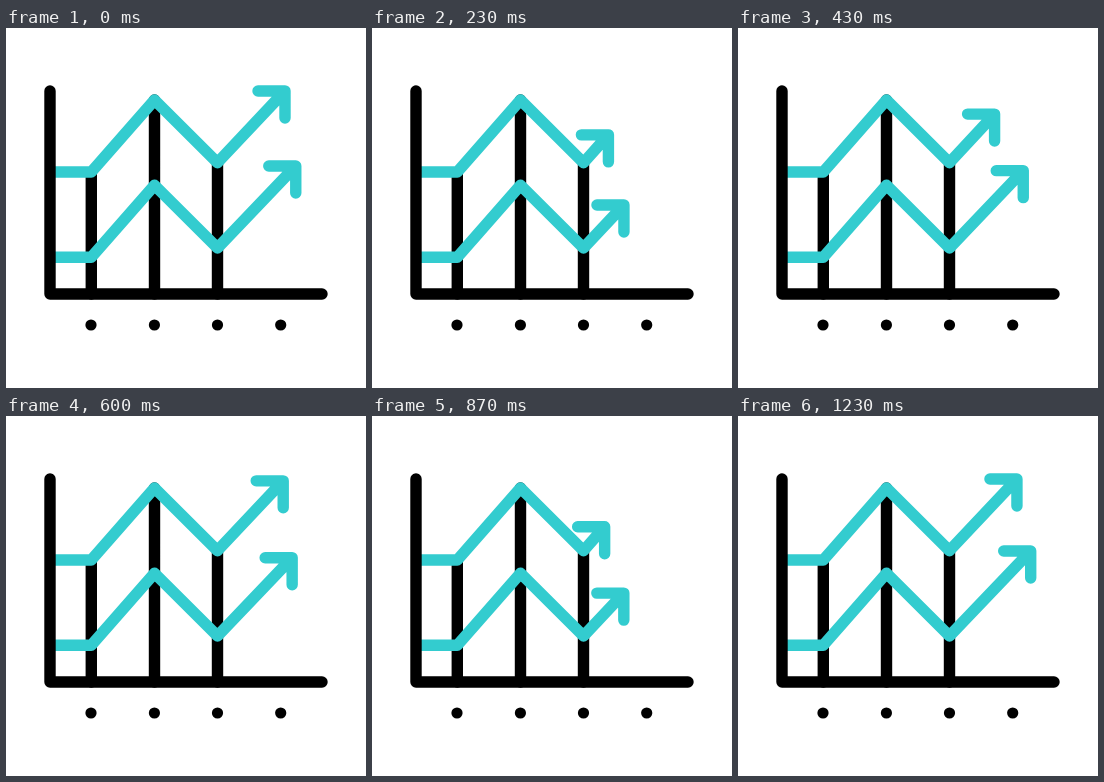
These frames come from a looping animation (360 px wide and 360 px high, 1670 ms). An HTML page:

```html
<!DOCTYPE html>
<html lang="en">
<head>
<meta charset="utf-8">
<title>Growth chart</title>
<style>
  html, body { margin: 0; width: 100%; height: 100%; overflow: hidden; background: #fff; }
  svg { display: block; width: 100vw; height: 100vh; }
  path { fill: none; stroke: #000; stroke-width: 11.4; stroke-linecap: round; stroke-linejoin: round; }
  .trend { stroke: #33cccf; }
</style>
</head>
<body>
<svg viewBox="0 0 360 360">
  <path d="M85.3 144V266M148.5 72V266M211.5 134.5V266"/>
  <path class="trend" id="upper"/>
  <path class="trend" id="lower"/>
  <path d="M44 63V266H316"/>
  <g>
    <circle cx="85" cy="297" r="5.6"/>
    <circle cx="148.4" cy="297" r="5.6"/>
    <circle cx="211.5" cy="297" r="5.6"/>
    <circle cx="274.7" cy="297" r="5.6"/>
  </g>
</svg>
<script>
const LOOP = 1670, FRAME = 1000 / 30, ARM = 27;

// keys: times in ms at which the arrow is out, in, out, in, out
const trends = [
  { id: 'upper', y: 144, tip: [279, 63], reach: 48, keys: [0, 295, 560, 905, 1240] },
  { id: 'lower', y: 229.3, tip: [292.7, 135], reach: 41, keys: [-43, 220, 513, 857, 1157] }
];

const smooth = u => u * u * (3 - 2 * u);

function retraction(keys, t) {
  const i = keys.findIndex((k, n) => t >= k && t < keys[n + 1]);
  if (i < 0) return 0;
  const s = smooth((t - keys[i]) / (keys[i + 1] - keys[i]));
  return i % 2 ? 1 - s : s;
}

function draw(now) {
  const t = Math.floor((now % LOOP + 4) / FRAME) * FRAME;
  for (const { id, y, tip, reach, keys } of trends) {
    const d = reach * retraction(keys, t);
    const tx = tip[0] - d, ty = tip[1] + d * 1.03;
    document.getElementById(id).setAttribute('d',
      `M48 ${y}H85.3L148.5 ${y - 72}L211.5 ${y - 9.3}L${tx} ${ty}` +
      `M${tx - ARM} ${ty}H${tx}V${ty + ARM}`);
  }
  requestAnimationFrame(draw);
}
requestAnimationFrame(draw);
</script>
</body>
</html>
```
